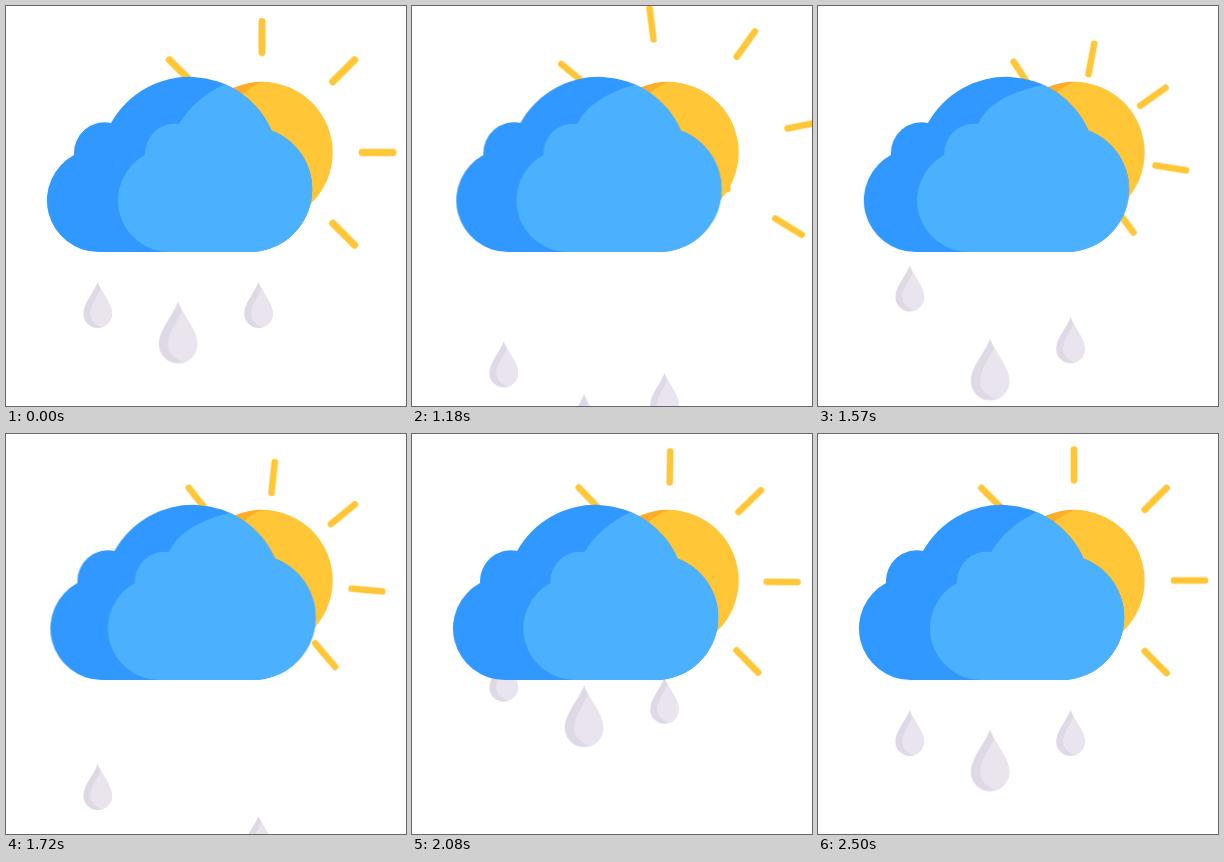
Animation of 400 by 400 pixels, one loop 2.53 s. Source, as an HTML page without scripts:

```html
<!DOCTYPE html>
<html lang="en">
<head>
<meta charset="utf-8">
<title>Sun, cloud and rain</title>
<style>
  html, body { margin: 0; width: 100%; height: 100%; overflow: hidden; background: #fff; }
  svg { display: block; width: 100%; height: 100%; }

  /* Rays: one set spirals outwards while the next set follows from behind the sun. */
  .rays { stroke: #ffc738; stroke-width: 6.6; stroke-linecap: round; }
  .rays line {
    --far: 87px;
    transform: rotate(var(--a));
    animation: 2530ms linear calc(var(--i) * 22ms) infinite;
  }
  .rays .in { animation-name: ray-in; }
  .rays .out { animation-name: ray-out; }
  @keyframes ray-in {
    0%, 20% { transform: rotate(var(--a)) translateY(0); }
    20.01%, 39.53% {
      transform: rotate(calc(var(--a) + 45deg)) translateY(var(--far));
      animation-timing-function: cubic-bezier(.17, .3, .22, .98);
    }
    89.72%, 100% { transform: rotate(var(--a)) translateY(0); }
  }
  @keyframes ray-out {
    0%, 39.53% {
      transform: rotate(var(--a)) translateY(0);
      animation-timing-function: cubic-bezier(.17, .3, .22, .98);
    }
    57% { opacity: 1; }
    57.01% { opacity: 0; }
    89.72%, 100% {
      transform: rotate(calc(var(--a) - 45deg)) translateY(calc(var(--far) * -1));
      opacity: 0;
    }
  }

  /* Cloud: sways right while its front part swells to the left. */
  .cloud { animation: sway 2530ms linear infinite; }
  .front { animation: swell 2530ms linear infinite; }
  @keyframes sway {
    0%, 39.6% { transform: none; animation-timing-function: cubic-bezier(.3, .5, .6, 1); }
    56.5% { transform: translateX(5.3px); animation-timing-function: ease-in-out; }
    84.2%, 100% { transform: none; }
  }
  @keyframes swell {
    0%, 39.6% {
      d: path("M163.5 246A51.6 51.6 0 0 1 139 149A30 30 0 0 1 173 118C184 100 200 87 219 78L330 50L330 246Z");
      animation-timing-function: cubic-bezier(.3, .5, .6, 1);
    }
    58% {
      d: path("M145 246A51.6 51.6 0 0 1 120.5 149A30 30 0 0 1 154.5 118C164 96 189 86 220 79L330 50L330 246Z");
      animation-timing-function: ease-in-out;
    }
    86%, 100% {
      d: path("M163.5 246A51.6 51.6 0 0 1 139 149A30 30 0 0 1 173 118C184 100 200 87 219 78L330 50L330 246Z");
    }
  }

  /* Rain: fall away, fall through once, then settle. */
  .drop { animation: 2530ms linear infinite; }
  .left { animation-name: fall-left; }
  .middle { animation-name: fall-middle; }
  .right { animation-name: fall-right; }
  @keyframes fall-left {
    0%, 40.5% { transform: translateY(0); }
    53.4% { transform: translateY(124px); }
    53.41% { transform: translateY(-120px); }
    73.9% { transform: translateY(124px); }
    73.91%, 75.1% { transform: translateY(-120px); animation-timing-function: cubic-bezier(.33, .67, .67, 1); }
    97.1%, 100% { transform: translateY(0); }
  }
  @keyframes fall-middle {
    0%, 40.2% { transform: translateY(0); }
    48.9% { transform: translateY(124px); }
    48.91% { transform: translateY(-120px); }
    69.4% { transform: translateY(124px); }
    69.41%, 73.8% { transform: translateY(-120px); animation-timing-function: cubic-bezier(.33, .67, .67, 1); }
    95.4%, 100% { transform: translateY(0); }
  }
  @keyframes fall-right {
    0%, 40.1% { transform: translateY(0); }
    49.05% { transform: translateY(124px); }
    49.06% { transform: translateY(-120px); }
    69.55% { transform: translateY(124px); }
    69.56%, 71.5% { transform: translateY(-120px); animation-timing-function: cubic-bezier(.33, .67, .67, 1); }
    93.9%, 100% { transform: translateY(0); }
  }
</style>
</head>
<body>
<svg viewBox="0 0 400 400">
  <defs>
    <path id="outline" d="M92.5 246A51.6 51.6 0 0 1 68 149A30.8 30.8 0 0 1 105 117A89.6 89.6 0 0 1 265.5 124.5A62.75 62.75 0 0 1 244 246Z"/>
    <clipPath id="inCloud"><use href="#outline"/></clipPath>
    <clipPath id="inSun"><circle cx="256" cy="146.5" r="70.7"/></clipPath>
    <g id="drop">
      <path fill="#dfd9e6" d="M0 0C4 11 14.3 21 14.3 31.7A14.3 14.3 0 0 1 -14.3 31.7C-14.3 21 -4 11 0 0Z"/>
      <path fill="#eae4ef" d="M3.2 6.5C7 15 14.3 22 14.3 31.7A14.3 14.3 0 0 1 4.6 45.2C-2 43 -7.5 38 -7.5 31.7C-7.5 23 0 14 3.2 6.5Z"/>
    </g>
  </defs>

  <g class="rays" transform="translate(256 146.5)">
    <line class="out" y1="-131" y2="-100" style="--a:135deg; --i:1"/>
    <line class="out" y1="-131" y2="-100" style="--a:90deg; --i:2"/>
    <line class="out" y1="-131" y2="-100" style="--a:45deg; --i:3"/>
    <line class="out" y1="-131" y2="-100" style="--a:0deg; --i:4"/>
    <line class="out" y1="-131" y2="-100" style="--a:-45deg; --i:5; --far:64px"/>
    <line class="in" y1="-131" y2="-100" style="--a:135deg; --i:0; --far:168px"/>
    <line class="in" y1="-131" y2="-100" style="--a:90deg; --i:1"/>
    <line class="in" y1="-131" y2="-100" style="--a:45deg; --i:2"/>
    <line class="in" y1="-131" y2="-100" style="--a:0deg; --i:3"/>
    <line class="in" y1="-131" y2="-100" style="--a:-45deg; --i:4"/>
  </g>

  <g clip-path="url(#inSun)">
    <rect x="180" y="70" width="150" height="150" fill="#fead29"/>
    <circle cx="286" cy="147" r="77" fill="#ffc738"/>
  </g>

  <g class="drop left"><use href="#drop" x="91.7" y="276"/></g>
  <g class="drop middle"><use href="#drop" transform="translate(172 295.5) scale(1.345)"/></g>
  <g class="drop right"><use href="#drop" x="252.5" y="276"/></g>

  <g class="cloud">
    <use href="#outline" fill="#3198ff"/>
    <g clip-path="url(#inCloud)">
      <path class="front" fill="#4bb1fe" d="M163.5 246A51.6 51.6 0 0 1 139 149A30 30 0 0 1 173 118C184 100 200 87 219 78L330 50L330 246Z"/>
    </g>
  </g>
</svg>
</body>
</html>
```
